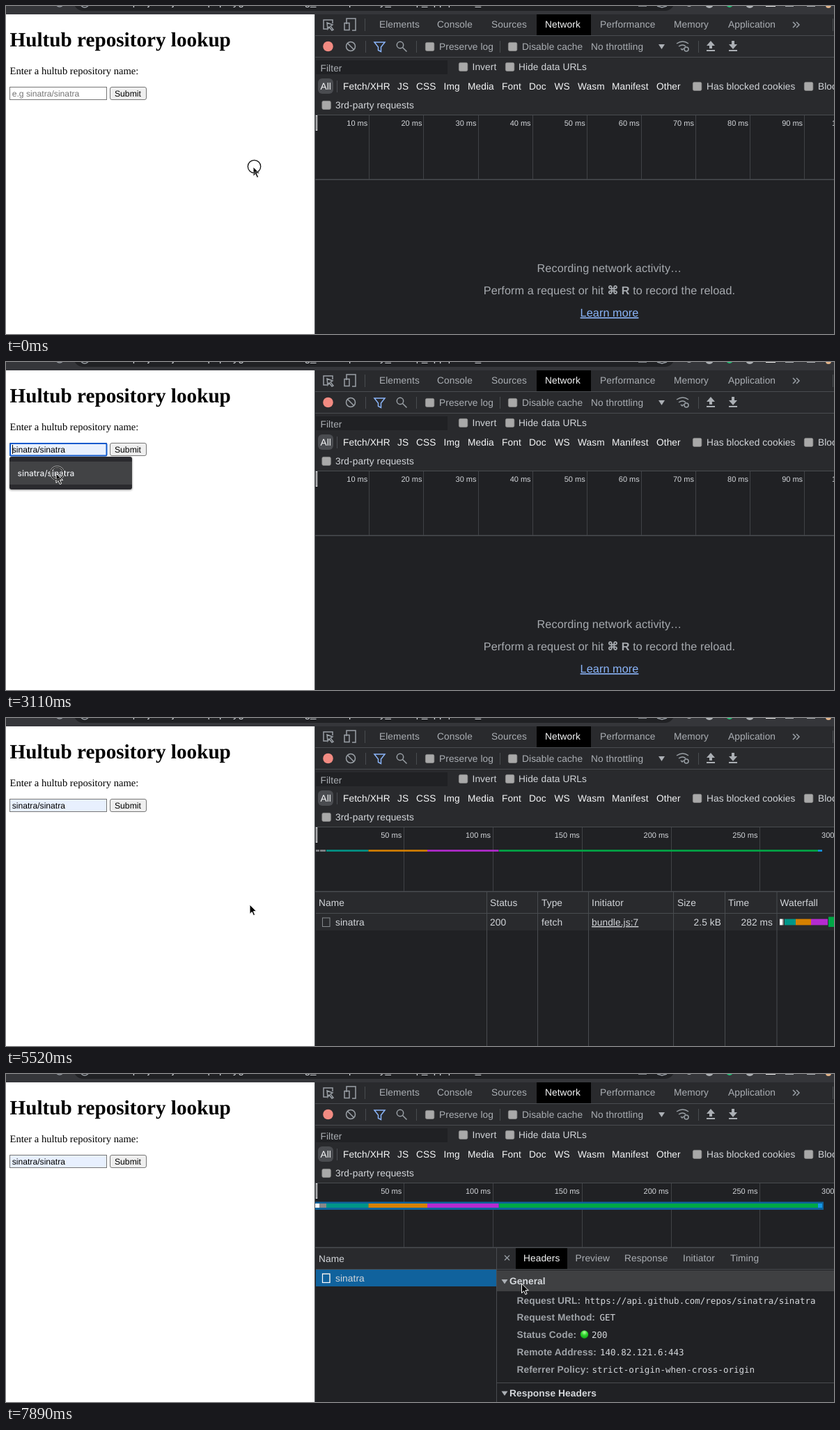
An HTML page that plays this animation: 1189 by 471 pixels, repeating every 8000 ms.

```html
<!DOCTYPE html>
<html lang="en">
<head>
<meta charset="utf-8">
<title>Repository lookup</title>
<style>
html, body { margin: 0; width: 100%; height: 100%; overflow: hidden; background: #fff; }
svg { display: block; width: 1189px; height: 471px; }
text { white-space: pre; font: 13.7px "Liberation Sans", Arial, sans-serif; text-rendering: geometricPrecision; }
.page text { fill: #000; font-family: "Liberation Serif", "Times New Roman", serif; }
.page .control { font: 12.17px "Liberation Sans", Arial, sans-serif; }
.page .option { font: 500 11.9px Inter, sans-serif; fill: #e8eaed; }
.tools text { fill: #d3d6da; letter-spacing: .1px; }
.tools .dim text, .tools .dim { fill: #abafb4; }
.tools .bright text, .tools text.bright { fill: #f6f7f8; }
.tools .small text { font-size: 11px; letter-spacing: 0; text-anchor: end; }
.tools .big text { font-size: 16.2px; text-anchor: middle; fill: #a6aaaf; }
.tools .end { text-anchor: end; }
.tools .label text { font-weight: bold; fill: #9fa3a8; }
.tools .title text { font-weight: bold; fill: #d5d8dc; }
.tools .mono text { font: 12.53px "DejaVu Sans Mono", monospace; letter-spacing: 0; fill: #d5d8dc; }
.icon { fill: none; stroke: #9aa0a6; stroke-width: 1.5; }
.rule { fill: none; stroke: #494c50; }
.box { fill: #a9a9a9; stroke: #8f8f8f; stroke-width: .8; }
</style>
</head>
<body>
<svg viewBox="0 0 1189 471">
  <defs>
    <radialGradient id="ok" cx=".5" cy=".25" r=".8">
      <stop offset="0" stop-color="#b6ffa0"/><stop offset=".45" stop-color="#2fd52f"/><stop offset="1" stop-color="#0b9a12"/>
    </radialGradient>
    <filter id="shade" x="-10%" y="-20%" width="120%" height="150%"><feDropShadow dx="0" dy="1" stdDeviation="1.5" flood-opacity=".45"/></filter>
  </defs>
  <rect width="1189" height="471" fill="#fff"/>

  <g class="browser">
    <rect width="1189" height="12" fill="#35363a"/>
    <rect x="97" y="-22" width="863" height="29" rx="14" fill="#202124"/>
    <circle cx="113" cy="-4" r="6" class="icon"/>
    <circle cx="77" cy="-5" r="6" class="icon"/>
    <text x="146" y="-1" fill="#d5d8dc" style="font-size:15px">file:///projects/javascript/playground/fetching_data/repository_lookup_app/public_files/index.html</text>
    <path d="M908 0h12M935 0l7 2 7-2" class="icon"/>
    <g fill="#aeb1b5">
      <circle cx="981" cy="-3" r="4"/><circle cx="1010" cy="-3" r="6"/><circle cx="1068" cy="-3" r="6"/>
      <rect x="1091" y="-3" width="14" height="4" fill="#eee"/><rect x="1119" y="-3" width="12" height="4"/>
      <rect x="1150" y="-3" width="12" height="4"/><circle cx="1181" cy="-1" r="4" fill="#e5b58a"/>
    </g>
    <circle cx="1039" cy="-3" r="5" fill="#25c678"/>
  </g>

  <g class="page">
    <text x="5.5" y="57.7" style="font-size:29.2px;font-weight:bold">Hultub repository lookup</text>
    <text x="5.5" y="98" style="font-size:14.6px">Enter a hultub repository name:</text>
    <rect x="5.5" y="116.5" width="139" height="18" fill="#fff" stroke="#767676"/>
    <rect data-t="2680-8000" x="5.5" y="116.5" width="139" height="18" fill="#e8f0fe" stroke="#767676"/>
    <rect data-t="1940-4600" x="6" y="117" width="138.5" height="17.5" rx="1.5" fill="none" stroke="#1059cc" stroke-width="2"/>
    <text data-t="0-2680" class="control" x="8.7" y="130" style="fill:#757575">e.g sinatra/sinatra</text>
    <text data-t="2680-8000" class="control" x="8.7" y="130">sinatra/sinatra</text>
    <path data-t="1940-3260" d="M9.5 119v13" stroke="#000"/>
    <path data-t="3260-4150" d="M85.5 119v13" stroke="#000"/>
    <rect x="149.5" y="116.5" width="52" height="18" rx="2.5" fill="#efefef" stroke="#767676"/>
    <rect data-t="3850-5380" x="149.5" y="116.5" width="52" height="18" rx="2.5" fill="#e2e2e2" stroke="#5a5a5a"/>
    <text class="control" x="156" y="130">Submit</text>
    <g data-t="2090-3260">
      <rect x="5" y="136" width="176" height="47" rx="3" fill="#292a2d" filter="url(#shade)"/>
      <rect data-t="2680-3260" x="5" y="143" width="176" height="33" fill="#424345"/>
      <text class="option" x="16.5" y="164">sinatra/sinatra</text>
    </g>
  </g>

  <g class="tools">
    <rect x="443" y="12" width="746" height="459" fill="#292a2d"/>
    <rect x="445" y="157" width="744" height="314" fill="#202124"/>
    <path class="rule" d="M443.5 12V471M444 42.5H1189M444 73.5H1189M444 156.5H1189"/>
    <path class="rule" stroke-width="1.5" d="M444 249.2H1189"/>
    <path class="rule" d="M515.5 18v18M516.5 50v17M589.5 50v17M709.5 50v17M994.5 50v17M475.5 107v17M1187.5 18v18"/>
    <rect x="762" y="12" width="78" height="30"/>

    <g class="dim" id="tabs"></g>
    <text class="bright" x="774" y="31">Network</text>
    <g class="icon">
      <path d="M461 33h-5V20h13v5M461 24l8 3-3 2 4 5-2 1-4-5-2 3z"/>
      <path d="M489 26V18h13v17h-5M486 24.5h7v10h-7z"/>
      <path d="M1130 23l4 4-4 4M1135 23l4 4-4 4"/>
      <circle cx="495" cy="58" r="6.5"/><path d="M490.5 53.5l9 9"/>
      <path d="M529 52h15l-5.5 7v6.5l-4-2V59z" stroke="#8ab4f8"/>
      <circle cx="566" cy="56" r="4.7"/><path d="M569.5 59.5l6 6"/>
      <path d="M963 54q9-6 17 0M966 58q6-4 10 0M969 61l2 2 2-2"/><circle cx="977" cy="62" r="3"/>
    </g>
    <g class="dim">
      <path d="M937 55h9l-4.5 7zM1012 50l6 7h-4v4h-4v-4h-4zM1044 62l6-7h-4v-5h-4v5h-4zM1006 63h12v2h-12zM1038 63h12v2h-12z"/>
      <text x="622" y="63">Preserve log</text>
      <text x="741" y="63">Disable cache</text>
      <text x="840" y="63">No throttling</text>
    </g>
    <circle cx="462.5" cy="58" r="7.3" fill="#f28b82"/>
    <rect x="445" y="78" width="189" height="20" fill="#202124"/>
    <text class="dim" x="451.5" y="94">Filter</text>
    <text x="669.5" y="92">Invert</text>
    <text x="736" y="92">Hide data URLs</text>
    <rect x="448" y="104" width="22" height="22" rx="6" fill="#4a4c50"/>
    <g class="bright" id="kinds"></g>
    <text x="1006" y="120">Has blocked cookies</text>
    <text x="1166" y="120">Blocked Requests</text>
    <text x="473" y="147">3rd-party requests</text>
    <g class="box" id="boxes"></g>

    <g data-t="0-5050" class="small" id="shortScale"></g>
    <g data-t="5050-8000" class="small" id="longScale"></g>
    <g data-t="5050-6850" id="thinBar"></g>
    <g data-t="6850-8000">
      <rect x="444" y="183.5" width="730" height="11.5" fill="#0e639c"/>
      <g id="thickBar"></g>
    </g>
    <path d="M446 157v22" stroke="#e8eaed" stroke-width="2.5"/>
    <path d="M446 158v20" stroke="#666"/>

    <g data-t="0-4750" class="big">
      <text x="866.5" y="382">Recording network activity…</text>
      <text x="866.5" y="414">Perform a request or hit <tspan font-weight="bold">⌘ R</tspan> to record the reload.</text>
      <text x="866.5" y="446" style="fill:#8ab4f8;text-decoration:underline">Learn more</text>
    </g>

    <g data-t="4750-8000">
      <rect x="445" y="250" width="744" height="30" fill="#292a2d"/>
      <rect x="445" y="281" width="744" height="24" fill="#292a2d"/>
      <rect id="hover" x="445" y="281" width="744" height="24" fill="#34373d"/>
      <rect data-t="6850-8000" x="445" y="281" width="744" height="24" fill="#10629d"/>
      <path class="rule" d="M445 280.5H1189"/>
      <text x="449" y="269.7">Name</text>
      <rect x="454.5" y="287" width="10.5" height="12.5" fill="none" stroke="#85898d"/>
      <rect data-t="6850-8000" x="454.5" y="287" width="10.5" height="12.5" fill="none" stroke="#fff" stroke-width="1.2"/>
      <text x="473" y="298">sinatra</text>
    </g>
    <g data-t="4750-7300">
      <path class="rule" d="M690.5 250V471M763.5 250V471M836.5 250V471M958.5 250V471M1032.5 250V471M1107 250V471"/>
      <g id="columns"></g>
      <text x="769" y="298">fetch</text>
      <text x="841" y="298" text-decoration="underline">bundle.js:7</text>
    </g>
    <g data-t="4750-5050">
      <text class="dim" x="695" y="298">(pending)</text>
      <text class="end" x="1027" y="298">0 B</text>
      <text class="end dim" x="1101" y="298">Pending</text>
    </g>
    <g data-t="5050-7300">
      <text x="695" y="298">200</text>
      <text class="end" x="1027" y="298">2.5 kB</text>
      <text class="end" x="1101" y="298">282 ms</text>
      <g id="waterfall"></g>
    </g>

    <g data-t="7300-8000">
      <rect x="704" y="250" width="485" height="221" fill="#202124"/>
      <rect x="704" y="250" width="485" height="30" fill="#292a2d"/>
      <rect x="732" y="250" width="74" height="30"/>
      <rect x="705" y="282" width="484" height="30" fill="#3f4042"/>
      <path class="rule" d="M704.5 250V471M705 280.5H1189M705 443.5H1189"/>
      <path class="icon" style="stroke-width:1.2" d="M716 260.5l7 7M723 260.5l-7 7"/>
      <g class="dim" id="panes"></g>
      <text class="bright" x="743" y="269">Headers</text>
      <path class="dim" d="M711.5 295h9l-4.5 6.500zM711.5 455.5h9l-4.5 6.500z"/>
      <g class="title">
        <text x="723" y="302">General</text>
        <text x="723" y="463">Response Headers</text>
      </g>
      <g class="label" id="labels"></g>
      <g class="mono" id="values"></g>
      <circle cx="830.5" cy="374" r="5.7" fill="url(#ok)"/>
    </g>
  </g>

  <g id="pointer">
    <path data-shape="arrow" d="M0 0V13.5L3.2 10.6 5.4 15.6 7.6 14.6 5.4 9.7H9.7Z" stroke="#fff"/>
    <g data-shape="beam" fill="none">
      <path d="M-3-7.5Q0-7.5 0-5V5Q0 7.5-3 7.5M3-7.5Q0-7.5 0-5V5Q0 7.5 3 7.5" stroke="#fff" stroke-width="2.5" opacity=".6"/>
      <path d="M-3-7.5Q0-7.5 0-5V5Q0 7.5-3 7.5M3-7.5Q0-7.5 0-5V5Q0 7.5 3 7.5M-2 2H2" stroke="#000" stroke-width="1.2"/>
    </g>
    <path data-shape="hand" fill="#fff" stroke="#000" d="M-1 9V1.5Q.5-.5 2 1.5V6Q4 4.5 5 6.5 7 5.5 7.5 7.5 9 7 9 9V11Q9 13 7.5 14.5V15.5H0V14L-4 9Q-3.500 7-1 9Z"/>
    <g data-t="0-150 1940-2230 3110-3260 4600-4750 6850-7000" fill="none">
      <circle cx="1.5" cy="-.5" r="9.2" stroke="#fff" stroke-width="2.6" opacity=".7"/>
      <circle cx="1.5" cy="-.5" r="9.2" stroke="#111" stroke-width="1.3"/>
    </g>
  </g>
</svg>
<script>
const LOOP = 8000, STEP = 147;
const byId = id => document.getElementById(id);
const fill = (id, parts) => { byId(id).innerHTML = parts.join(''); };
const text = (x, y, s) => `<text x="${x}" y="${y}">${s}</text>`;
const row = (id, y, items) => fill(id, items.map(([s, x]) => text(x, y, s)));

row('tabs', 31, [['Elements', 536], ['Console', 619], ['Sources', 697], ['Performance', 853],
  ['Memory', 959], ['Application', 1037]]);
row('kinds', 120, [['All', 451.5], ['Fetch/XHR', 484], ['JS', 562], ['CSS', 589], ['Img', 628.5],
  ['Media', 663], ['Font', 712], ['Doc', 751], ['WS', 787.5], ['Wasm', 821], ['Manifest', 870], ['Other', 934]]);
row('columns', 269.7, [['Status', 695], ['Type', 769], ['Initiator', 841], ['Size', 964],
  ['Time', 1037], ['Waterfall', 1111.5]]);
row('panes', 269, [['Preview', 817.5], ['Response', 888], ['Initiator', 972], ['Timing', 1040]]);

fill('boxes', [[602, 52], [721, 52], [650, 81], [717, 81], [986, 109], [1146, 109], [453.5, 136]]
  .map(([x, y]) => `<rect x="${x + .4}" y="${y + .4}" width="12.4" height="12" rx="2"/>`));

const details = [['Request URL:', 'https://api.github.com/repos/sinatra/sinatra', 831],
  ['Request Method:', 'GET', 852.5], ['Status Code:', '200', 841],
  ['Remote Address:', '140.82.121.6:443', 853], ['Referrer Policy:', 'strict-origin-when-cross-origin', 841.5]];
const detailY = i => 329.5 + 24.9 * i;
fill('labels', details.map(([label], i) => text(733.5, detailY(i), label)));
fill('values', details.map(([, value, x], i) => text(x, detailY(i), value)));

function scale(id, start, gap, unit, inset) {
  const ticks = Array.from({ length: 10 }, (_, i) => [start + gap * i, `${unit * (i + 1)} ms`]);
  fill(id, ticks.map(([x, label]) =>
    `<path d="M${Math.round(x) + .5} 157V249" stroke="#404246"/>` + text(x - inset, 171.7, label)));
}
scale('shortScale', 521.3, 78.1, 10, 2);
scale('longScale', 571.2, 127.8, 50, 3);

const TEAL = '#009688', ORANGE = '#d68100', PURPLE = '#b52bd0', GREEN = '#00a846', BLUE = '#1597e5';
const segment = (x, end, color, y, h) =>
  `<rect x="${x}" y="${y}" width="${end - x}" height="${h}" fill="${color}"/>`;
const phases = [[460, 520.5, TEAL], [520.5, 605, ORANGE], [605, 707.5, PURPLE],
  [708, 1166, GREEN], [1166, 1172, BLUE]];
const bars = (head, y, h) => [...head, ...phases].map(p => segment(...p, y, h));
fill('thinBar', bars([[445, 450, '#85898d'], [451, 459, '#85898d']], 189.2, 2.6));
fill('thickBar', bars([[444, 450, '#fff'], [450, 460, '#888']], 186, 6));
fill('waterfall', [
  ...[[1111, 1115, '#fff'], [1115, 1117, '#888'], [1118, 1134, TEAL], [1134, 1156, ORANGE],
    [1156, 1180, PURPLE]].map(p => segment(...p, 288.6, 8.8)),
  segment(1181, 1189, GREEN, 285.5, 14.5)]);

// Each pointer move: start time, number of steps, end point.
const moves = [[750, 8, 65, 128], [2530, 3, 72, 160], [3260, 5, 168, 125.5],
  [5380, 2, 350, 268], [5670, 6, 482.5, 295], [7750, 2, 740.5, 301]];

function pointerAt(t) {
  let x = 355, y = 231;
  for (const [start, steps, endX, endY] of moves) {
    if (t < start) break;
    const p = Math.min(1, (Math.floor((t - start) / STEP + .08) + 1) / steps);
    const k = p * p * (3 - 2 * p);
    x += (endX - x) * k;
    y += (endY - y) * k;
  }
  return { x, y };
}

const timed = [...document.querySelectorAll('[data-t]')].map(el => ({
  el, spans: el.dataset.t.split(' ').map(s => s.split('-').map(Number))
}));
const shapes = [...document.querySelectorAll('[data-shape]')];
const show = (el, on) => { el.style.display = on ? '' : 'none'; };

function draw(now) {
  const t = now % LOOP;
  for (const { el, spans } of timed) show(el, spans.some(([a, b]) => t >= a && t < b));
  const { x, y } = pointerAt(t);
  const overInput = x > 5 && x < 145 && y > 115 && y < 136;
  const overRow = x > 445 && y > 281 && y < 305 && t < 7750;
  const shape = overInput ? 'beam' : overRow ? 'hand' : 'arrow';
  for (const el of shapes) show(el, el.dataset.shape === shape);
  show(byId('hover'), overRow && t < 6850);
  byId('pointer').setAttribute('transform', `translate(${x} ${y})`);
}

const began = performance.now();
function tick() {
  draw(performance.now() - began);
  requestAnimationFrame(tick);
}
tick();
</script>
</body>
</html>
```
